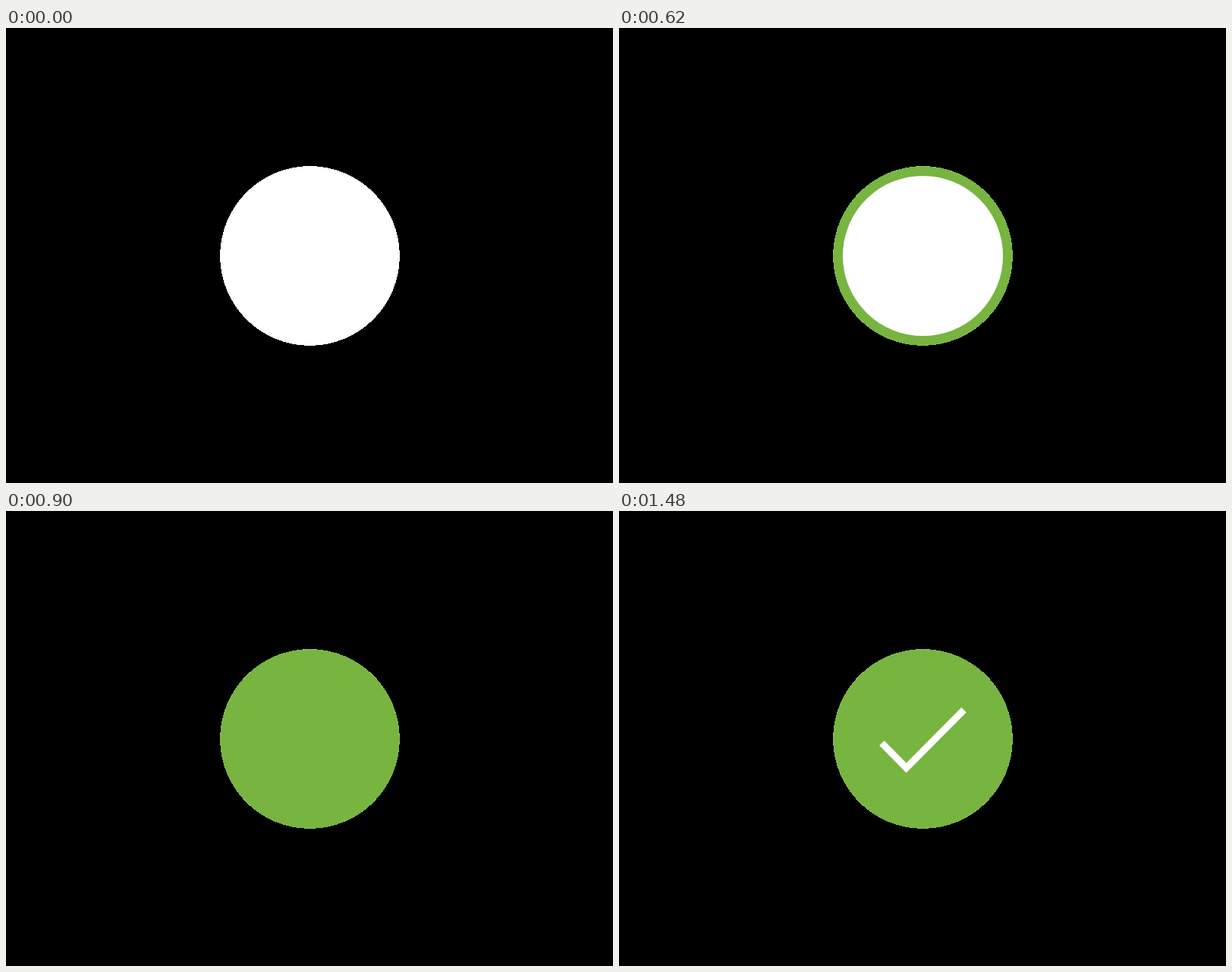
An HTML page for the animation above (1820 ms loop, 800x600 px).

```html
<!DOCTYPE html>
<html lang="en">
<head>
<meta charset="utf-8">
<title>Success check</title>
<style>
  html, body { margin: 0; width: 100%; height: 100%; overflow: hidden; background: #000; }
  svg { display: block; width: 800px; height: 600px; }
</style>
</head>
<body>
<svg viewBox="0 0 800 600">
  <rect x="270" y="170" width="261" height="261" fill="#fff"/>
  <g id="badge" fill="none">
    <circle id="fill" stroke="#78b440"/>
    <g transform="scale(4.548) translate(-26 -26)" stroke-width="2">
      <circle id="ring" cx="26" cy="26" r="25" stroke="#78b440"/>
      <path id="check" d="M14.1 27.2l7.1 7.2 16.7-16.8" stroke="#fff"/>
    </g>
  </g>
  <!-- black stage with a round opening -->
  <path fill-rule="evenodd" shape-rendering="crispEdges"
    d="M0 0H800V600H0ZM282.1 300.5a118.4 118.4 0 1 0 236.8 0a118.4 118.4 0 1 0 -236.8 0Z"/>
</svg>
<script>
  const LOOP = 1820, STEP = 20, SPEED = 5 / 6;
  const RADIUS = 118.25, PX = RADIUS / 28;
  const el = id => document.getElementById(id);
  const badge = el('badge'), fill = el('fill'), ring = el('ring'), check = el('check');

  const clamp = v => Math.min(1, Math.max(0, v));

  // cubic-bezier(x1, 0, x2, 1), solved by bisection
  function bezier(x1, x2) {
    return x => {
      if (x <= 0 || x >= 1) return clamp(x);
      let lo = 0, hi = 1;
      for (let i = 0; i < 30; i++) {
        const s = (lo + hi) / 2, r = 1 - s;
        if (3 * r * r * s * x1 + 3 * r * s * s * x2 + s * s * s < x) lo = s;
        else hi = s;
      }
      return lo * lo * (3 - 2 * lo);
    };
  }
  const drawEase = bezier(0.65, 0.45);
  const inOut = bezier(0.42, 0.58);

  function drawLine(node, length) {
    node.style.display = length > 0 ? '' : 'none';
    node.setAttribute('stroke-dasharray', length.toFixed(3) + ' 400');
  }

  function render(ms) {
    const line = (ms - 17.5) * SPEED;
    const body = (ms - 24) * SPEED;

    drawLine(ring, 166 * drawEase(clamp(line / 600)));
    drawLine(check, 48 * drawEase(clamp((line - 800) / 300)));

    // the fill grows inwards in whole units
    const inset = Math.min(28, Math.floor(30 * inOut(clamp((body - 400) / 400)))) * PX;
    fill.style.display = inset > 0 ? '' : 'none';
    fill.setAttribute('r', RADIUS - inset / 2);
    fill.setAttribute('stroke-width', inset);

    const pulse = 1 - Math.abs(2 * clamp((body - 900) / 300) - 1);
    const scale = 1 + 0.1 * inOut(pulse);
    badge.setAttribute('transform', `translate(400.5 300.5) scale(${scale})`);
  }

  const start = performance.now();
  function tick() {
    const t = (performance.now() - start) % LOOP;
    render(Math.floor(t / STEP) * STEP);
    requestAnimationFrame(tick);
  }
  tick();
</script>
</body>
</html>
```
